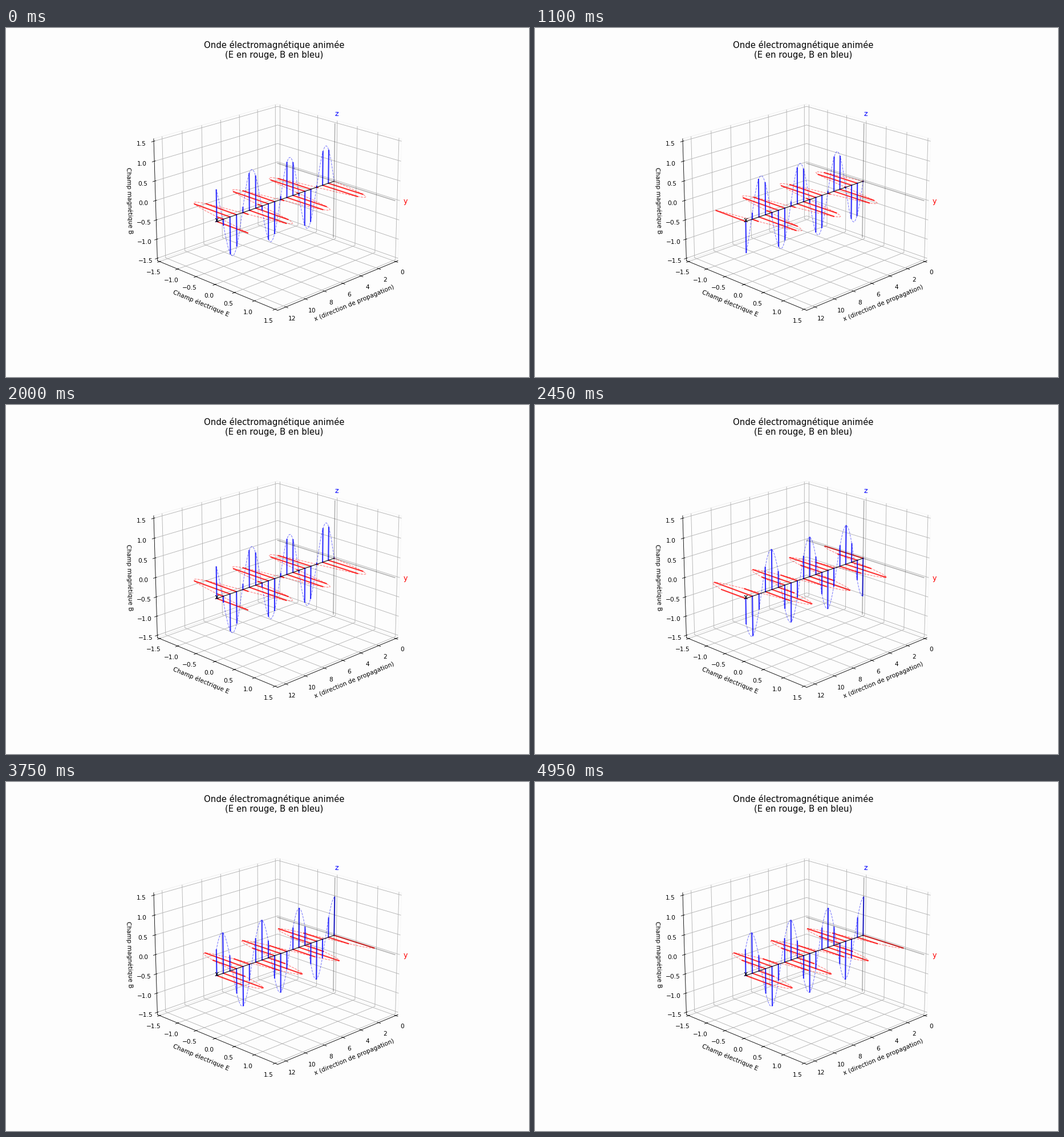
Recreate the animation shown at these times as a matplotlib script. Size 917x611 px, loop 5 s.

```python
import numpy as np
import matplotlib.pyplot as plt
from matplotlib.animation import FuncAnimation

W, H = 917, 611
DPI = W / 12
FRAMES, INTERVAL = 100, 50
X_MAX = 4 * np.pi
WAVELENGTH = 4
STEPS_PER_PERIOD = 4
BACKGROUND = "#fdfdfd"

plt.rcParams["font.family"] = "DejaVu Sans"


def wave(x, frame):
    return np.sin(2 * np.pi * (x / WAVELENGTH - frame / STEPS_PER_PERIOD))


def padded(low, high):
    margin = (high - low) / 48
    return low - margin, high + margin


def spikes(values):
    """Segments from zero to each value, separated by gaps."""
    gaps = np.full_like(values, np.nan)
    return np.column_stack([np.zeros_like(values), values, gaps]).ravel()


fig = plt.figure(figsize=(12, H / DPI + 1e-9), dpi=DPI, facecolor=BACKGROUND)
ax = fig.add_subplot(projection="3d", facecolor=BACKGROUND)
ax.view_init(elev=20, azim=45)
ax.set_title("Onde électromagnétique animée\n(E en rouge, B en bleu)",
             fontsize=14, pad=20)
ax.set_xlabel("x (direction de propagation)")
ax.set_ylabel("Champ électrique E")
ax.set_zlabel("Champ magnétique B")
for axis in (ax.xaxis, ax.yaxis, ax.zaxis):
    axis.pane.fill = False

x_curve = np.linspace(0, X_MAX, 200)
x_spike = np.linspace(0, X_MAX, 20)
x_spike_line = np.repeat(x_spike, 3)
curve_zero = np.zeros_like(x_curve)
spike_zero = np.zeros_like(x_spike_line)


def line(color, **style):
    return ax.plot([], [], [], color=color, **style)[0]


e_curve, b_curve = (line(c, ls="--", lw=1, alpha=0.5) for c in ("red", "blue"))
e_spikes, b_spikes = (line(c, lw=2, alpha=0.8) for c in ("red", "blue"))

# Reference axes through the origin
ax.plot([0, X_MAX], [0, 0], [0, 0], color="black", lw=1)
ax.plot([0, 0], [-1.5, 1.5], [0, 0], color="black", alpha=0.3)
ax.plot([0, 0], [0, 0], [-1.5, 1.5], color="black", alpha=0.3)
ax.text(X_MAX + 0.2, 0, 0, "x", color="black", fontsize=12)
ax.text(0, 1.7, 0, "y", color="red", fontsize=12)
ax.text(0, 0, 1.7, "z", color="blue", fontsize=12)

ax.set_xlim(*padded(0, X_MAX))
ax.set_ylim(*padded(-1.5, 1.5))
ax.set_zlim(*padded(-1.5, 1.5))


def update(frame):
    curve = wave(x_curve, frame)
    spike = spikes(wave(x_spike, frame))
    e_curve.set_data_3d(x_curve, curve, curve_zero)
    b_curve.set_data_3d(x_curve, curve_zero, curve)
    e_spikes.set_data_3d(x_spike_line, spike, spike_zero)
    b_spikes.set_data_3d(x_spike_line, spike_zero, spike)
    return e_curve, b_curve, e_spikes, b_spikes


anim = FuncAnimation(fig, update, frames=FRAMES, interval=INTERVAL,
                     repeat=True, repeat_delay=0)
plt.show()
```
